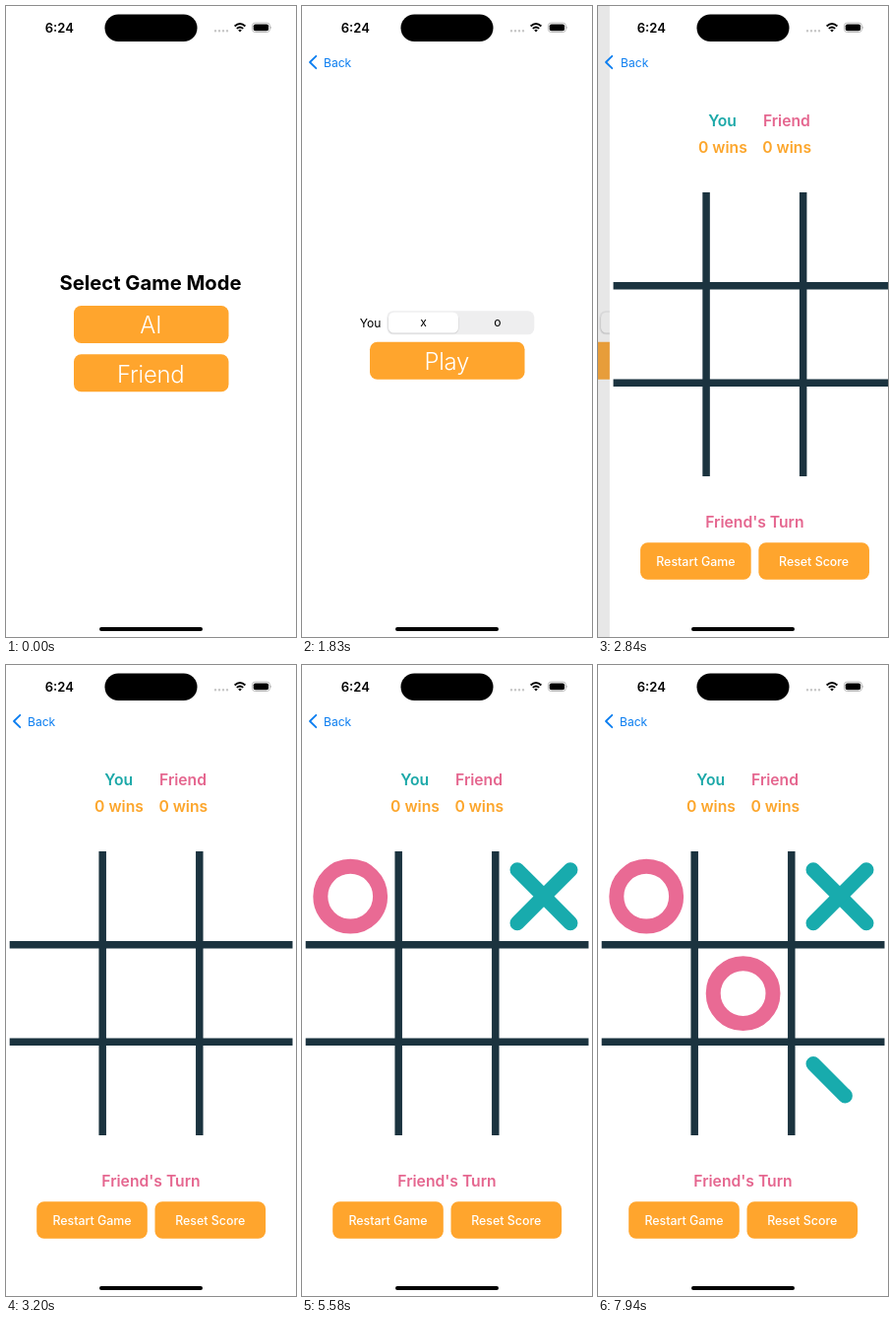
An HTML page that plays this animation: 295 by 640 pixels, repeating every 8000 ms.

```html
<!DOCTYPE html>
<html lang="en">
<head>
<meta charset="utf-8">
<title>Tic-tac-toe</title>
<style>
  html, body { margin: 0; width: 100%; height: 100%; overflow: hidden; background: #fff; }
  svg { display: block; width: 295px; height: 640px; font-family: Inter, Roboto, sans-serif; }
  .title { font-size: 20.2px; font-weight: 700; }
  .big { font-size: 23.8px; font-weight: 300; letter-spacing: -.2px; fill: #fff; }
  .body { font-size: 12.1px; }
  .score { font-size: 15.7px; font-weight: 600; }
  .small { font-size: 12.4px; font-weight: 500; fill: #fff; }
  .mid { text-anchor: middle; }
  .btn { fill: #ffa52d; }
  .you { fill: #1ba8a8; }
  .friend { fill: #e5668f; }
  .wins { fill: #fca62c; }
  .page { fill: #fff; }
  .blue { fill: #0a7df0; }
  .grid { stroke: #1b333f; stroke-width: 7.5; }
  .mark { fill: none; stroke-width: 15; stroke-linecap: round; }
</style>
</head>
<body>
<svg viewBox="0 0 295 640">
  <g id="home">
    <rect class="page" width="295" height="640"/>
    <text class="title mid" x="147" y="287.5">Select Game Mode</text>
    <rect class="btn" x="69" y="304" width="157.5" height="38" rx="7.5"/>
    <text class="big mid" x="147.3" y="332">AI</text>
    <g id="friendBtn">
      <rect class="btn" x="69" y="353.3" width="157.5" height="38" rx="7.5"/>
      <text class="big mid" x="147.3" y="381.5">Friend</text>
    </g>
    <rect id="homeDim" width="295" height="640"/>
  </g>

  <g id="setup">
    <rect class="page" width="295" height="640"/>
    <text class="body" x="58.7" y="325.6">You</text>
    <rect x="86.3" y="309.3" width="150" height="24" rx="6.5" fill="#eeeeef"/>
    <rect x="87.5" y="311.5" width="72" height="21" rx="5.5" fill="#000" opacity=".1"/>
    <rect x="88" y="310.8" width="71" height="20.7" rx="5.2" fill="#fff"/>
    <text class="body mid" x="123.5" y="325">x</text>
    <text class="body mid" x="199" y="325">o</text>
    <g id="playBtn">
      <rect class="btn" x="69" y="340.8" width="157.5" height="38" rx="7.5"/>
      <text class="big mid" x="147.3" y="368.7">Play</text>
    </g>
    <rect id="setupDim" width="295" height="640"/>
  </g>

  <g id="game">
    <rect class="page" width="295" height="640"/>
    <g class="score mid">
      <text class="you" x="114.7" y="121.7">You</text>
      <text class="friend" x="180" y="121.7">Friend</text>
      <text class="wins" x="115" y="149">0 wins</text>
      <text class="wins" x="180.3" y="149">0 wins</text>
      <text id="turn" x="147.5" y="529"></text>
    </g>
    <path class="grid" d="M98.2 189V477M196.8 189V477M3.7 283.8H291.5M3.7 382.2H291.5"/>
    <g id="marks"></g>
    <rect class="btn" x="31.2" y="544.3" width="112.6" height="37.5" rx="7.5"/>
    <rect class="btn" x="151.5" y="544.3" width="112.6" height="37.5" rx="7.5"/>
    <text class="small mid" x="87.5" y="567.6">Restart Game</text>
    <text class="small mid" x="207.7" y="567.6">Reset Score</text>
  </g>

  <g id="nav">
    <path d="M14.3 50.8L8 57L14.3 63.2" fill="none" stroke="#0a7df0" stroke-width="1.8" stroke-linecap="round" stroke-linejoin="round"/>
    <text id="backOld" class="body blue" y="61.5">Back</text>
    <text id="backNew" class="body blue" y="61.5">Back</text>
  </g>

  <g id="status">
    <text x="39.8" y="26.6" font-size="13" font-weight="600">6:24</text>
    <rect x="100.5" y="8.5" width="94" height="27.6" rx="13.8"/>
    <path d="M213 25.3H225.5" stroke="#c6c6c6" stroke-width="2.4" stroke-linecap="round" stroke-dasharray="0 4"/>
    <g fill="none" stroke="#000" stroke-width="1.9">
      <path d="M232.6 20.5Q238 15.4 243.4 20.5"/>
      <path d="M234.8 22.9Q238 20 241.2 22.9"/>
    </g>
    <path d="M236.2 24.5Q238 23.1 239.8 24.5L238 26.4Z"/>
    <rect x="250.4" y="17.1" width="18" height="9.4" rx="3" fill="none" stroke="#aaa" stroke-width=".8"/>
    <rect x="251.7" y="18.4" width="15.4" height="6.8" rx="1.9"/>
    <path d="M269.3 20.2Q271 21.8 269.3 23.4Z" fill="#aaa"/>
    <rect x="95" y="630" width="105" height="4" rx="2"/>
  </g>
</svg>
<script>
const LOOP = 8000;
const STROKE = 250;
// The screen refreshes only at these moments.
const TICKS = [
  0, 1090, 1200, 1310, 1410, 1510, 1610, 1830,
  2430, 2530, 2640, 2740, 2840, 2940, 3200,
  3750, 3850, 3960, 4060, 4170, 4270,
  5070, 5170, 5280, 5380, 5480, 5580,
  6590, 6700, 6800, 6910, 7030, 7830, 7940
];
const MOVES = [
  { kind: "o", col: 0, row: 0, start: 3710 },
  { kind: "x", col: 2, row: 0, start: 5030 },
  { kind: "o", col: 1, row: 1, start: 6520 },
  { kind: "x", col: 2, row: 2, start: 7790 }
];

const el = id => document.getElementById(id);
const clamp = v => Math.max(0, Math.min(1, v));
const shift = (id, x) => el(id).setAttribute("transform", `translate(${x.toFixed(2)} 0)`);
const fade = (id, v) => el(id).setAttribute("opacity", v.toFixed(3));

function addPath(d, color) {
  const path = document.createElementNS("http://www.w3.org/2000/svg", "path");
  path.setAttribute("d", d);
  path.setAttribute("class", "mark");
  path.setAttribute("stroke", color);
  path.setAttribute("pathLength", 1);
  el("marks").append(path);
  return path;
}

for (const move of MOVES) {
  const x = 49.2 + 98.4 * move.col, y = 234.7 + 98.4 * move.row;
  move.paths = move.kind === "o"
    ? [addPath(`M${x + 30.4} ${y}a30.4 30.4 0 1 1 -60.8 0a30.4 30.4 0 1 1 60.8 0`, "#e96a94")]
    : [addPath(`M${x - 27} ${y - 27}l54 54`, "#18abad"),
       addPath(`M${x + 27} ${y - 27}l-54 54`, "#18abad")];
}

function trim(path, amount) {
  path.style.display = amount > 0 ? "" : "none";
  path.setAttribute("stroke-dasharray", amount < 1 ? `${amount} 2` : "none");
}

// Critically damped spring from 0 to 1.
function spring(ms) {
  const s = Math.max(0, ms) * 0.013;
  const v = 1 - (1 + s) * Math.exp(-s);
  return v > 0.997 ? 1 : v;
}

const pressed = (t, start) => t < start ? 1 : clamp(0.45 + (t - start) / 900);

function push(oldPage, newPage, p) {
  shift(oldPage, -88.5 * p);
  shift(newPage, 295 * (1 - p));
  fade(oldPage + "Dim", 0.1 * p);
}

function draw(time) {
  const t = TICKS.findLast(tick => tick <= time);
  const first = spring(t - 1074), second = spring(t - 2455);

  push("home", "setup", first);
  if (second > 0) push("setup", "game", second);
  else { shift("game", 295); fade("setupDim", 0); }
  fade("friendBtn", pressed(t, 1090));
  fade("playBtn", pressed(t, 2430));

  fade("nav", first);
  shift("backOld", 22 - 30 * second);
  fade("backOld", clamp(1 - 2 * second));
  shift("backNew", 22 + 27 * (1 - second));
  fade("backNew", Math.sqrt(second));

  let played = 0;
  for (const { start, paths } of MOVES) {
    if (t >= start) played++;
    const span = 2 * STROKE / paths.length;
    paths.forEach((path, i) => trim(path, clamp((t - start) / span - i)));
  }
  const yours = played % 2 === 1;
  el("turn").textContent = yours ? "Your Turn" : "Friend's Turn";
  el("turn").setAttribute("class", yours ? "you" : "friend");
}

const origin = performance.now();
function frame() {
  draw((performance.now() - origin) % LOOP);
  requestAnimationFrame(frame);
}
draw(0);
requestAnimationFrame(frame);
</script>
</body>
</html>
```
